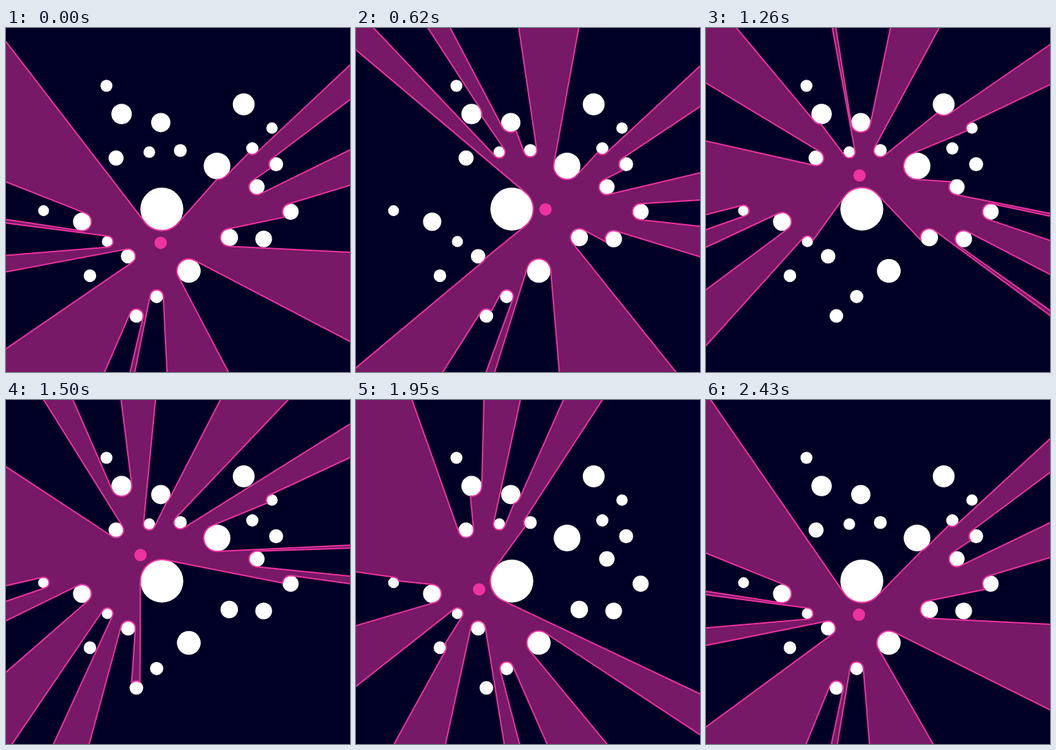
These frames come from a looping animation (500 by 500 pixels, 2.45 s). An HTML page with a canvas:

```html
<!DOCTYPE html>
<html>
<head>
<meta charset="utf-8">
<style>
  html, body { margin: 0; width: 100%; height: 100%; overflow: hidden; background: #000026; }
  canvas { display: block; }
</style>
</head>
<body>
<canvas id="stage" width="500" height="500"></canvas>
<script>
const ctx = document.getElementById('stage').getContext('2d');
const NIGHT = '#000026', GLOW = '#771966', PINK = '#ee329f';
const LOOP = 2450, STEPS = 122, TAU = Math.PI * 2;
const FAR = 1500, RAYS = 1440, EPS = 1e-4;
const ORBIT = 49, START = 92 / 360 * TAU;

const hub = { x: 226.5, y: 263.2, r: 31.2 };

// Centres of the scattered discs, smallest disc first.
const centres = [
  [54.6, 265.5], [147.4, 310.4], [386.6, 145.5], [208.3, 180.4], [146, 84], [358, 175],
  [122, 360], [253.4, 178], [219, 390.3], [189.5, 418.4], [392.6, 198], [177.5, 331.8],
  [160, 189], [364.6, 231], [413.7, 267], [374.5, 306.7], [324.5, 304.5], [110.7, 281.5],
  [225, 137.4], [168, 125], [345.5, 111], [265.7, 353], [306.8, 200.6]
];

// Radii follow an exponential distribution: many small discs, few large ones.
const radius = rank => 7.8 - 4.2 * Math.log(1 - (rank + 0.5) / (centres.length + 1));
const discs = [hub, ...centres.map(([x, y], rank) => ({ x, y, r: radius(rank) }))];

function fillDisc(x, y, r, color) {
  ctx.fillStyle = color;
  ctx.beginPath();
  ctx.arc(x, y, r, 0, TAU);
  ctx.fill();
}

// Where a ray from the light first meets a disc.
function castRay(lx, ly, angle) {
  const c = Math.cos(angle), s = Math.sin(angle);
  let nearest = FAR;
  for (const { x, y, r } of discs) {
    const dx = x - lx, dy = y - ly;
    const along = dx * c + dy * s, off = dx * s - dy * c;
    if (along > 0 && Math.abs(off) < r) {
      nearest = Math.min(nearest, along - Math.sqrt(r * r - off * off));
    }
  }
  return [lx + c * nearest, ly + s * nearest];
}

// Even rays all round, plus a pair at both tangents of every disc.
function litArea(lx, ly) {
  const angles = Array.from({ length: RAYS }, (_, i) => i / RAYS * TAU);
  for (const { x, y, r } of discs) {
    const mid = Math.atan2(y - ly, x - lx);
    const half = Math.asin(r / Math.hypot(x - lx, y - ly));
    for (const tangent of [mid - half, mid + half]) {
      for (const a of [tangent - EPS, tangent + EPS]) angles.push((a + TAU) % TAU);
    }
  }
  return angles.sort((a, b) => a - b).map(a => castRay(lx, ly, a));
}

function draw(time) {
  const step = Math.floor(time / LOOP * STEPS + 0.4);
  const angle = START - step / STEPS * TAU;
  const lx = hub.x + ORBIT * Math.cos(angle), ly = hub.y + ORBIT * Math.sin(angle);

  ctx.fillStyle = NIGHT;
  ctx.fillRect(0, 0, 500, 500);
  for (const { x, y, r } of discs) fillDisc(x, y, r, '#fff');

  ctx.beginPath();
  for (const [x, y] of litArea(lx, ly)) ctx.lineTo(x, y);
  ctx.closePath();
  ctx.fillStyle = GLOW;
  ctx.fill();
  ctx.strokeStyle = PINK;
  ctx.lineWidth = 2;
  ctx.lineJoin = 'round';
  ctx.stroke();

  fillDisc(lx, ly, 9, PINK);
}

function tick() {
  draw(performance.now() % LOOP);
  requestAnimationFrame(tick);
}
tick();
</script>
</body>
</html>
```
